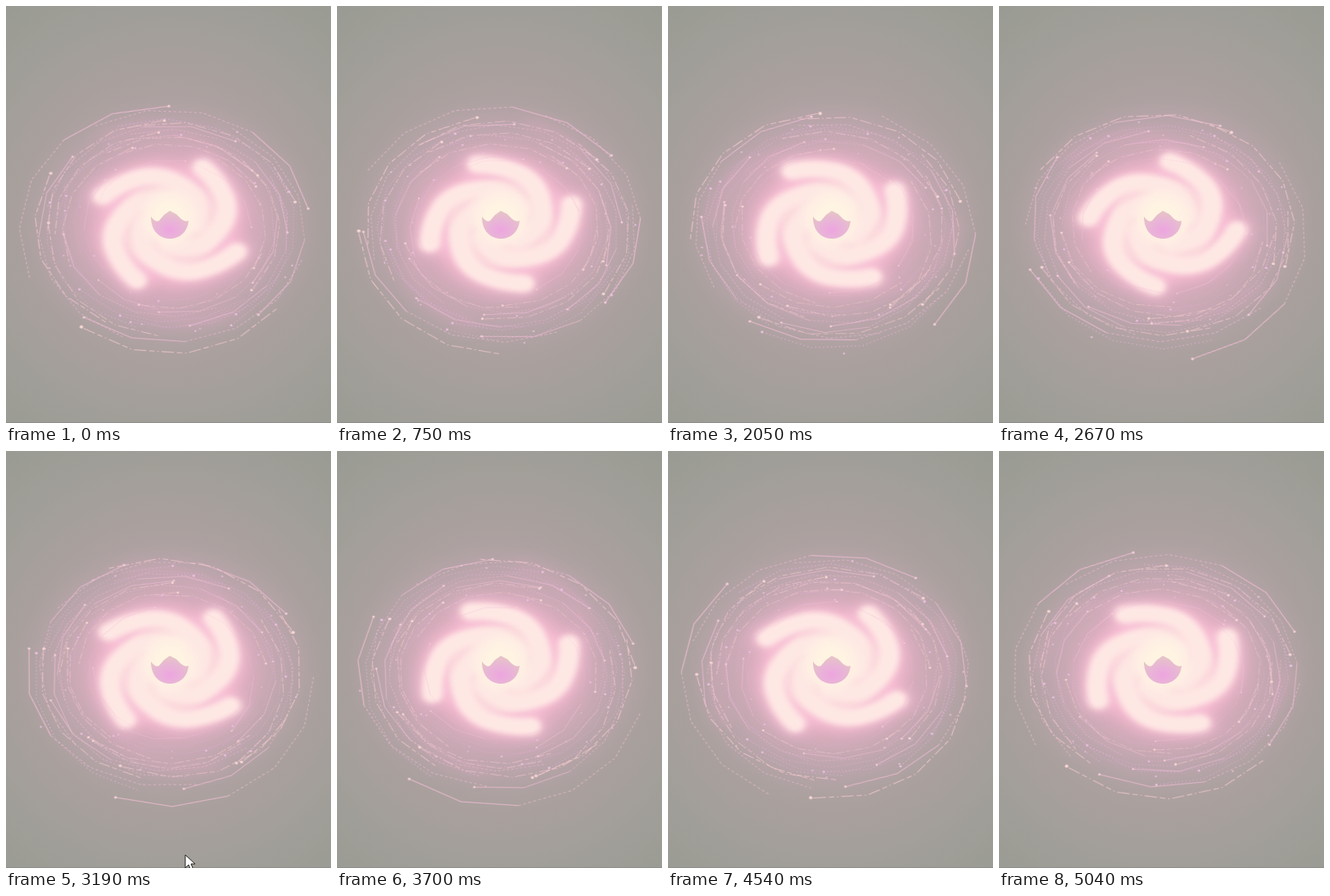
Animation, 397 px wide and 509 px high, one loop 5140 ms. Source, as an HTML page without scripts:

```html
<!DOCTYPE html>
<html lang="en">
<head>
<meta charset="utf-8">
<title>Spiral galaxy</title>
<style>
  html, body { margin: 0; width: 100%; height: 100%; overflow: hidden; background: #9b9c94; }
  svg { display: block; width: 397px; height: 509px; }

  .core, .swarm use { animation: 5140ms steps(41) -5ms infinite; }
  .core { animation-name: spin; }
  .swarm use {
    --turn: calc(1200deg - var(--r) * 300deg);
    animation-name: orbit;
  }
  .pointer { animation: show 5140ms step-end infinite; }

  @keyframes spin {
    from { transform: rotate(30deg); }
    to { transform: rotate(341deg); }
  }
  @keyframes orbit {
    from { transform: rotate(var(--a)) scale(var(--r)); }
    to { transform: rotate(calc(var(--a) + var(--turn))) scale(var(--r)); }
  }
  @keyframes show {
    0%, 64.98% { opacity: 0; }
    61.87% { opacity: 1; }
  }

  .trail { fill: none; stroke-width: .62; }
  .pink { stroke: #f5bfd8; fill: #fbd3df; }
  .violet { stroke: #eeb4e0; fill: #f3c4e8; }
  .peach { stroke: #f7cbd0; fill: #ffdcd9; }
</style>
</head>
<body>
<svg viewBox="0 0 397 509">
  <defs>
    <radialGradient id="sky" gradientUnits="userSpaceOnUse" cx="200" cy="262" r="330">
      <stop offset=".3" stop-color="#b3a3a6"/>
      <stop offset=".55" stop-color="#a9a09d"/>
      <stop offset=".78" stop-color="#a09e98"/>
      <stop offset="1" stop-color="#999b93"/>
    </radialGradient>
    <radialGradient id="haze">
      <stop offset=".4" stop-color="#eeb2c8"/>
      <stop offset=".56" stop-color="#ddaec0" stop-opacity=".75"/>
      <stop offset=".78" stop-color="#c7a8b5" stop-opacity=".45"/>
      <stop offset="1" stop-color="#b5a3a8" stop-opacity="0"/>
    </radialGradient>
    <radialGradient id="heart">
      <stop offset=".35" stop-color="#fff4e2"/>
      <stop offset=".65" stop-color="#feefe3" stop-opacity=".9"/>
      <stop offset="1" stop-color="#fee8e4" stop-opacity="0"/>
    </radialGradient>
    <radialGradient id="hole" cx=".5" cy=".68" r=".6">
      <stop offset="0" stop-color="#eda5df"/>
      <stop offset=".5" stop-color="#e9b3d8"/>
      <stop offset="1" stop-color="#e6c2c8"/>
    </radialGradient>
    <filter id="soft" x="-50%" y="-50%" width="200%" height="200%"><feGaussianBlur stdDeviation="4"/></filter>
    <filter id="blur" x="-50%" y="-50%" width="200%" height="200%"><feGaussianBlur stdDeviation="9"/></filter>

    <path id="arm" d="M6 91C-14 85-28 76-39 66S-56 42-56 28-54 5-50-4-32-24-16-28"/>
    <g id="arms">
      <use href="#arm"/>
      <use href="#arm" transform="rotate(90)"/>
      <use href="#arm" transform="rotate(180)"/>
      <use href="#arm" transform="rotate(270)"/>
    </g>
    <path id="wisp" d="M132 72C95 122 45 132 0 108"/>

    <!-- Trails lie on a sixteen-sided orbit, with the head at angle zero. -->
    <g id="long" class="pink">
      <path class="trail" d="M100 0 92.4-38.3 70.7-70.7"/>
      <path class="trail" d="M70.7-70.7 38.3-92.4 0-100-38.3-92.4" stroke-dasharray="2 1.6" opacity=".75"/>
      <circle cx="100" r="1" stroke="none"/>
    </g>
    <g id="dots" class="violet">
      <path class="trail" d="M100 0 92.4-38.3 70.7-70.7 38.3-92.4 0-100" stroke-dasharray="1 2"/>
      <circle cx="100" r="1.1" stroke="none"/>
      <circle cx="84" cy="-62" r=".8" stroke="none"/>
    </g>
    <g id="dash" class="peach">
      <path class="trail" d="M100 0 92.4-38.3 70.7-70.7 38.3-92.4 0-100" stroke-dasharray="9 2 4 2 1 2"/>
      <circle cx="100" cy="2" r="1.3" stroke="none"/>
    </g>
    <g id="swarm" class="swarm">
      <use href="#long" style="--r:1.03;--a:200deg"/>
      <use href="#dots" style="--r:1.13;--a:75deg"/>
      <use href="#dash" style="--r:1.22;--a:310deg"/>
      <use href="#dots" style="--r:1.28;--a:170deg"/>
      <use href="#long" style="--r:1.34;--a:20deg"/>
      <use href="#dash" style="--r:1.39;--a:245deg"/>
      <use href="#dots" style="--r:1.44;--a:120deg"/>
      <use href="#long" style="--r:1.5;--a:285deg"/>
      <use href="#dots" style="--r:1.56;--a:40deg"/>
      <use href="#dash" style="--r:1.63;--a:190deg"/>
      <use href="#long" style="--r:1.73;--a:335deg"/>
    </g>
  </defs>

  <rect width="397" height="509" fill="url(#sky)"/>
  <ellipse cx="200" cy="266" rx="190" ry="160" fill="url(#haze)"/>

  <g transform="translate(200 266) scale(1 .84)" fill="none" stroke-linecap="round">
    <g class="core">
      <g filter="url(#blur)" stroke="#e5aac3" stroke-width="16" opacity=".3">
        <use href="#wisp"/>
        <use href="#wisp" transform="rotate(180)"/>
      </g>
      <g filter="url(#blur)">
        <circle r="80" fill="#f6bfd3"/>
        <use href="#arms" stroke="#f8c0d5" stroke-width="32"/>
      </g>
      <circle r="64" fill="#fbd6db" filter="url(#soft)"/>
      <use href="#arms" stroke="#fee8e4" stroke-width="25" filter="url(#soft)"/>
    </g>
  </g>

  <circle cx="200" cy="259" r="45" fill="url(#heart)"/>
  <path d="M177 257Q183 265 187 262L193 255 200 250 208 254 214 260Q219 264 223 262C222 276 212 284 200 284S177 275 177 257Z" fill="url(#hole)"/>

  <g opacity=".88">
    <use href="#swarm" transform="translate(198 268) scale(1 .82)"/>
    <use href="#swarm" transform="translate(200 272) scale(.97 .8) rotate(137)"/>
    <use href="#swarm" transform="translate(196 278) rotate(5) scale(1.04 .9) rotate(275)"/>
    <use href="#swarm" transform="translate(203 269) rotate(7) scale(.94 .79) rotate(52)"/>
  </g>

  <rect y="508" width="397" height="1" fill="#8f8e8b"/>
  <path class="pointer" d="M219 493v16l4-4 3 7 3-1-3-7h5z" fill="#fff" stroke="#222" stroke-width="1"/>
</svg>
</body>
</html>
```
